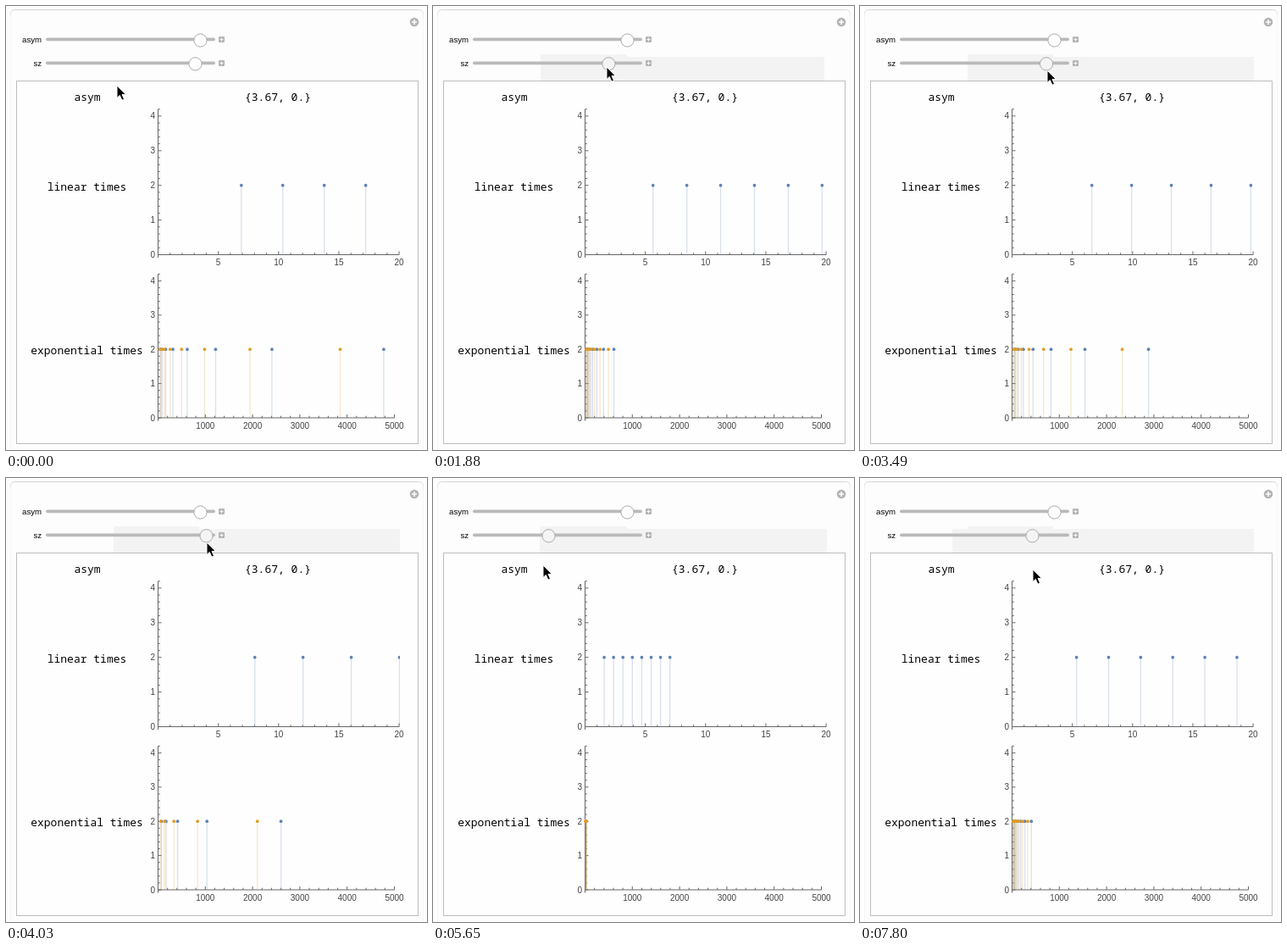
These frames come from a looping animation (497x524 px, 8 s). An HTML page:

```html
<!DOCTYPE html>
<html>
<head>
<meta charset="utf-8">
<style>
html, body { margin: 0; width: 100%; height: 100%; overflow: hidden; background: #fdfdfd; }
svg { display: block; }
text { font: 10px "Liberation Sans", Arial, sans-serif; fill: #444; }
.label { font-size: 9.6px; fill: #000; text-anchor: end; }
.mono { font: 13px "Noto Sans Mono", "DejaVu Sans Mono", monospace; fill: #000; text-anchor: middle; }
.axis { stroke: #666; stroke-width: 1; fill: none; }
.knob { stroke: #a9a9a9; stroke-width: 1; }
</style>
</head>
<body>
<svg width="497" height="524" viewBox="0 0 497 524">
  <defs>
    <linearGradient id="edge" x1="0" y1="4" x2="0" y2="14" gradientUnits="userSpaceOnUse">
      <stop offset="0" stop-color="#d4d4d4"/><stop offset="1" stop-color="#f6f6f6"/>
    </linearGradient>
    <clipPath id="clip"><rect x="170" y="110" width="295" height="385"/></clipPath>
  </defs>
  <path d="M5.5 524V9.500q0-5 5-5H487.500q5 0 5 5V524" fill="none" stroke="url(#edge)"/>
  <g id="shade" fill="#f3f3f3"></g>
  <circle cx="482" cy="19" r="5.300" fill="#b4b4b4"/>
  <path d="M479 19h6M482 16v6" stroke="#fff" stroke-width="1.500"/>
  <g id="controls"></g>
  <rect x="12.500" y="88.500" width="474" height="428" fill="#fefefe" stroke="#bdbdbd"/>
  <text class="mono" x="96" y="112">asym</text>
  <text class="mono" x="321" y="112">{3.67, 0.}</text>
  <text class="mono" x="95.500" y="218">linear times</text>
  <text class="mono" x="95.500" y="411">exponential times</text>
  <g id="axes"></g>
  <g id="data" clip-path="url(#clip)"></g>
  <circle id="knob" class="knob" cy="68.300" r="7.600"/>
  <path id="cursor" d="M0 0V14.500L3.300 11.400 5.900 17.200 8.500 16 6 10.400H10.400Z" stroke="#fff" stroke-width="1"/>
</svg>
<script>
const $ = id => document.getElementById(id);
const BLUE = '#5e81b5', ORANGE = '#e19c24';
const X0 = 179.5;
const linear = { y: 293.5, unit: 40.9, max: 20, width: 284.6, minor: 1, major: 5 };
const expo = { y: 486, unit: 40.4, max: 5000, width: 279, minor: 200, major: 1000 };

// step, slider x, cursor x, cursor y
const KEYS = [
  [0, 223.5, 131, 94], [1, 223.5, 138, 92], [4, 223.5, 207, 70], [5, 218.5, 214, 68],
  [7, 207.4, 205, 72], [10, 192.5, 194, 76], [11, 195, 196, 76], [13, 220, 221, 76],
  [15, 236.5, 237, 76], [16, 232, 231, 80], [18, 203, 199, 90], [21, 136.5, 130, 103],
  [22, 122, 114, 105], [23, 118, 111, 106], [24, 128.5, 125, 107], [26, 167.5, 168, 108],
  [29, 203.5, 204, 108]
];

function slider(name, y) {
  return `<text class="label" x="42" y="${y + 3.5}">${name}</text>
    <rect x="47" y="${y - 1.9}" width="200" height="3.600" rx="1.800" fill="#bababa"/>
    <rect x="251" y="${y - 3.5}" width="7" height="7" rx="1" fill="#b4b4b4"/>
    <path d="M252.500 ${y}h4M254.500 ${y - 2}v4" stroke="#fff"/>`;
}

function axes(p) {
  const top = p.y - 4.2 * p.unit;
  let d = `M${X0} ${top}V${p.y + 3.5}M${X0} ${p.y}h${p.width}`, labels = '';
  for (let i = 0; i <= 21; i++) {
    const y = p.y - i * p.unit / 5;
    d += `M${X0} ${y}h${i % 5 ? 2.3 : 4}`;
    if (i % 5 == 0) labels += `<text x="176" y="${y + 3.5}" text-anchor="end">${i / 5}</text>`;
  }
  for (let v = p.minor; v <= p.max; v += p.minor) {
    const x = X0 + v / p.max * p.width, big = v % p.major == 0;
    d += `M${x} ${p.y}v${big ? -4 : -2.3}`;
    if (big) labels += `<text x="${x}" y="${p.y + 12.5}" text-anchor="middle">${v}</text>`;
  }
  return `<path class="axis" d="${d}"/>${labels}`;
}

function stems(p, sets) {
  const y = p.y - 2 * p.unit;
  let lines = '', dots = '';
  for (const [color, values] of sets)
    for (const v of values) {
      if (v > p.max * 1.002) continue;
      const x = X0 + 0.4 + v / p.max * p.width;
      lines += `<path d="M${x} ${p.y}V${y}" stroke="${color}" stroke-width="1.300" opacity=".23"/>`;
      dots += `<circle cx="${x}" cy="${y}" r="1.850" fill="${color}"/>`;
    }
  return lines + dots;
}

function shade(step) {
  if (step < 4) return '';
  let s = '<rect x="127" y="57" width="101" height="31"/>';
  if (step > 4) {
    const left = step < 17 ? 127 : step < 22 ? 126 : 109;
    const right = step < 7 ? 459 : step < 13 ? 462 : 465;
    s += `<rect x="${left}" y="60" width="${right - left}" height="28"/>`;
  }
  return s;
}

function pose(step) {
  const i = Math.max(1, KEYS.findIndex(k => k[0] >= step));
  const a = KEYS[i - 1], b = KEYS[i], u = (step - a[0]) / (b[0] - a[0]);
  return a.map((v, j) => v + (b[j] - v) * u);
}

function draw(step) {
  const [, x, cx, cy] = pose(step);
  const gap = ((x - 57.5) / 89.5) ** 2;
  const ks = [2, 3, 4, 5, 6, 7, 8, 9];
  const grow = ks.map(k => 10 * Math.exp(0.0579 * gap * gap * k));
  $('data').innerHTML = stems(linear, [[BLUE, ks.map(k => k * gap)]]) +
    stems(expo, [[BLUE, grow], [ORANGE, grow.map(v => v * 0.807)]]);
  $('shade').innerHTML = shade(step);
  $('knob').setAttribute('cx', x);
  $('knob').setAttribute('fill', step < 5 ? '#fff' : '#f4f4f4');
  $('cursor').setAttribute('transform', `translate(${cx} ${cy})`);
}

$('controls').innerHTML = slider('asym', 39.5) + slider('sz', 67.5) +
  '<circle class="knob" cx="229.500" cy="40.500" r="7.600" fill="#fff"/>';
$('axes').innerHTML = axes(linear) + axes(expo);

let last = -1;
function tick(now) {
  const t = now % 8000;
  const lead = t < 600 ? 0 : t < 7100 ? 20 : 30;
  const step = Math.min(29, Math.floor((t + lead) / 270));
  if (step != last) draw(last = step);
  requestAnimationFrame(tick);
}
draw(0);
requestAnimationFrame(tick);
</script>
</body>
</html>
```
